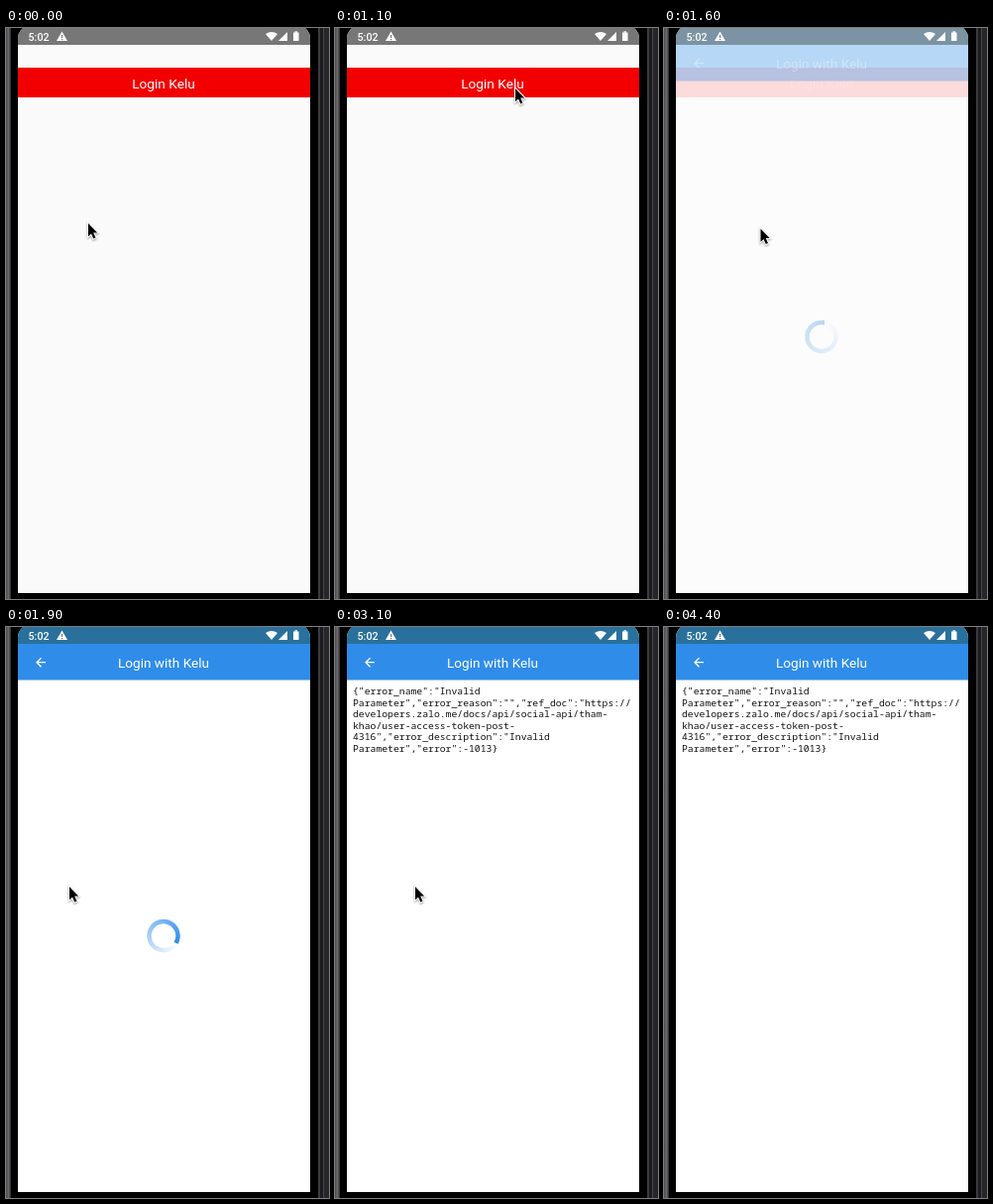
Animation of 326x576 px, one loop 4.5 s. Source, as an HTML page with a canvas:

```html
<!DOCTYPE html>
<html lang="en">
<head>
<meta charset="utf-8">
<title>Login demo</title>
<style>
  html, body { margin: 0; width: 100%; height: 100%; overflow: hidden; background: #000; }
  canvas { display: block; width: 326px; height: 576px; }
</style>
</head>
<body>
<canvas id="stage" width="326" height="576"></canvas>
<script>
const ctx = document.getElementById('stage').getContext('2d');
const LOOP = 4500, STEP = 100;
const LEFT = 12, RIGHT = 307, BOTTOM = 570, MID = 159;

const reply = [
  '{"error_name":"Invalid',
  'Parameter","error_reason":"","ref_doc":"https://',
  'developers.zalo.me/docs/api/social-api/tham-',
  'khao/user-access-token-post-',
  '4316","error_description":"Invalid',
  'Parameter","error":-1013}'
];

// Pointer path: time, x, y
const path = [
  [0, 83, 197], [100, 88, 186], [300, 130, 115], [500, 176, 75], [600, 183, 70],
  [800, 183, 70], [1100, 182, 61], [1300, 182, 61], [1400, 160, 105], [1500, 119, 165],
  [1700, 76, 240], [1900, 64, 262], [2200, 66, 269], [2500, 66, 269], [3100, 81, 262], [4500, 81, 262]
];
const POINTER_GONE = 3300, PRESS = 1200, OPEN = 1500, OPENED = 1800, LOADED = 2300;

const clamp = v => Math.max(0, Math.min(1, v));

function rect(x, y, w, h, color) {
  ctx.fillStyle = color;
  ctx.fillRect(x, y, w, h);
}

function poly(points, color) {
  ctx.beginPath();
  points.forEach(([x, y]) => ctx.lineTo(x, y));
  ctx.closePath();
  ctx.fillStyle = color;
  ctx.fill();
}

function text(str, x, y, font, color, align = 'left') {
  ctx.font = font;
  ctx.fillStyle = color;
  ctx.textAlign = align;
  ctx.fillText(str, x, y);
}

function drawFrame() {
  rect(0, 0, 326, 576, '#000');
  const metal = ctx.createLinearGradient(0, 0, 5, 0);
  metal.addColorStop(0, '#4b494c');
  metal.addColorStop(0.5, '#6b696c');
  metal.addColorStop(1, '#2a292b');
  rect(0, 0, 5, 576, metal);
  rect(315, 0, 2, 576, '#3b3a3e');
  rect(317, 0, 3, 576, '#1b1b1e');
  rect(320, 0, 1, 576, '#48474b');
  rect(321, 0, 5, 576, '#25252a');
}

function drawStatus() {
  text('5:02', 22.5, 12.5, '500 10.7px Roboto, sans-serif', '#fff');
  poly([[56.5, 3.5], [62, 13], [51, 13]], '#fff');
  rect(56, 7, 1.2, 3, '#777');
  rect(56, 11, 1.2, 1.2, '#777');

  ctx.beginPath();
  ctx.moveTo(268, 13);
  ctx.lineTo(262, 6);
  ctx.quadraticCurveTo(268, 1.8, 274, 6);
  ctx.closePath();
  ctx.fillStyle = '#fff';
  ctx.fill();

  poly([[284, 4], [284, 13], [275, 13]], '#fff');
  rect(290, 4.5, 5.5, 8.5, '#fff');
  rect(291.5, 3.3, 2.5, 1.5, '#fff');
}

function drawLogin(pressed) {
  rect(LEFT, 0, RIGHT - LEFT, BOTTOM, '#fafafa');
  rect(LEFT, 0, RIGHT - LEFT, 17, '#777');
  ctx.save();
  ctx.globalAlpha = pressed ? 0.2 : 1;
  rect(LEFT, 40, RIGHT - LEFT, 30, '#f20000');
  text('Login Kelu', MID, 60.5, '13.7px Roboto, sans-serif', '#fff', 'center');
  ctx.restore();
}

function drawSpinner(t) {
  const y = 311.5;
  const head = Math.PI / 6 + (t - 1900) / 1000 * Math.PI * 2;
  const tint = ctx.createConicGradient(head, MID, y);
  tint.addColorStop(0, 'rgba(46,141,235,0)');
  tint.addColorStop(0.25, 'rgba(46,141,235,.25)');
  tint.addColorStop(0.6, 'rgba(46,141,235,.6)');
  tint.addColorStop(1, 'rgba(46,141,235,1)');
  ctx.beginPath();
  ctx.arc(MID, y, 14.5, head, head + Math.PI * 2);
  ctx.strokeStyle = tint;
  ctx.lineWidth = 4.5;
  ctx.stroke();
}

function drawWeb(t) {
  rect(LEFT, 0, RIGHT - LEFT, BOTTOM, '#fff');
  rect(LEFT, 0, RIGHT - LEFT, 17, '#29719c');
  rect(LEFT, 17, RIGHT - LEFT, 36.5, '#2f8de9');
  text('Login with Kelu', MID, 41, '13.6px Roboto, sans-serif', '#fff', 'center');

  ctx.beginPath();
  ctx.moveTo(40, 35.7);
  ctx.lineTo(31, 35.7);
  ctx.moveTo(35.5, 31.2);
  ctx.lineTo(31, 35.7);
  ctx.lineTo(35.5, 40.2);
  ctx.strokeStyle = '#fff';
  ctx.lineWidth = 1.3;
  ctx.stroke();

  if (t < LOADED) {
    drawSpinner(t);
  } else {
    reply.forEach((line, i) =>
      text(line, 18, 68.3 + i * 11.5, '9.75px "Noto Sans Mono", monospace', '#111'));
  }
}

function pointerAt(t) {
  const i = path.findIndex(p => p[0] > t);
  const [t0, x0, y0] = path[i - 1], [t1, x1, y1] = path[i];
  const k = (t - t0) / (t1 - t0);
  return [x0 + (x1 - x0) * k, y0 + (y1 - y0) * k];
}

function drawPointer(t) {
  const [x, y] = pointerAt(t);
  ctx.save();
  ctx.translate(x, y);
  ctx.beginPath();
  [[0, 0], [0, 13.2], [3, 10.4], [5.3, 15.6], [7.5, 14.6], [5.2, 9.6], [9.2, 9.4]]
    .forEach(([px, py]) => ctx.lineTo(px, py));
  ctx.closePath();
  ctx.strokeStyle = '#fff';
  ctx.lineWidth = 2;
  ctx.shadowColor = 'rgba(0,0,0,.4)';
  ctx.shadowBlur = 2;
  ctx.shadowOffsetY = 1;
  ctx.stroke();
  ctx.shadowColor = 'transparent';
  ctx.fillStyle = '#000';
  ctx.fill();
  ctx.restore();
}

function draw(now) {
  const t = Math.floor((now % LOOP) / STEP) * STEP;
  const opened = clamp((t - OPEN) / (OPENED - OPEN));
  drawFrame();
  ctx.save();
  ctx.beginPath();
  ctx.roundRect(LEFT, -3, RIGHT - LEFT, BOTTOM + 3, [14, 14, 0, 0]);
  ctx.clip();
  if (opened < 1) drawLogin(t >= PRESS);
  if (opened > 0) {
    ctx.globalAlpha = opened;
    drawWeb(t);
    ctx.globalAlpha = 1;
  }
  drawStatus();
  ctx.restore();
  if (t < POINTER_GONE) drawPointer(t);
}

const start = performance.now();
function tick() {
  draw(performance.now() - start);
  requestAnimationFrame(tick);
}
tick();
</script>
</body>
</html>
```
